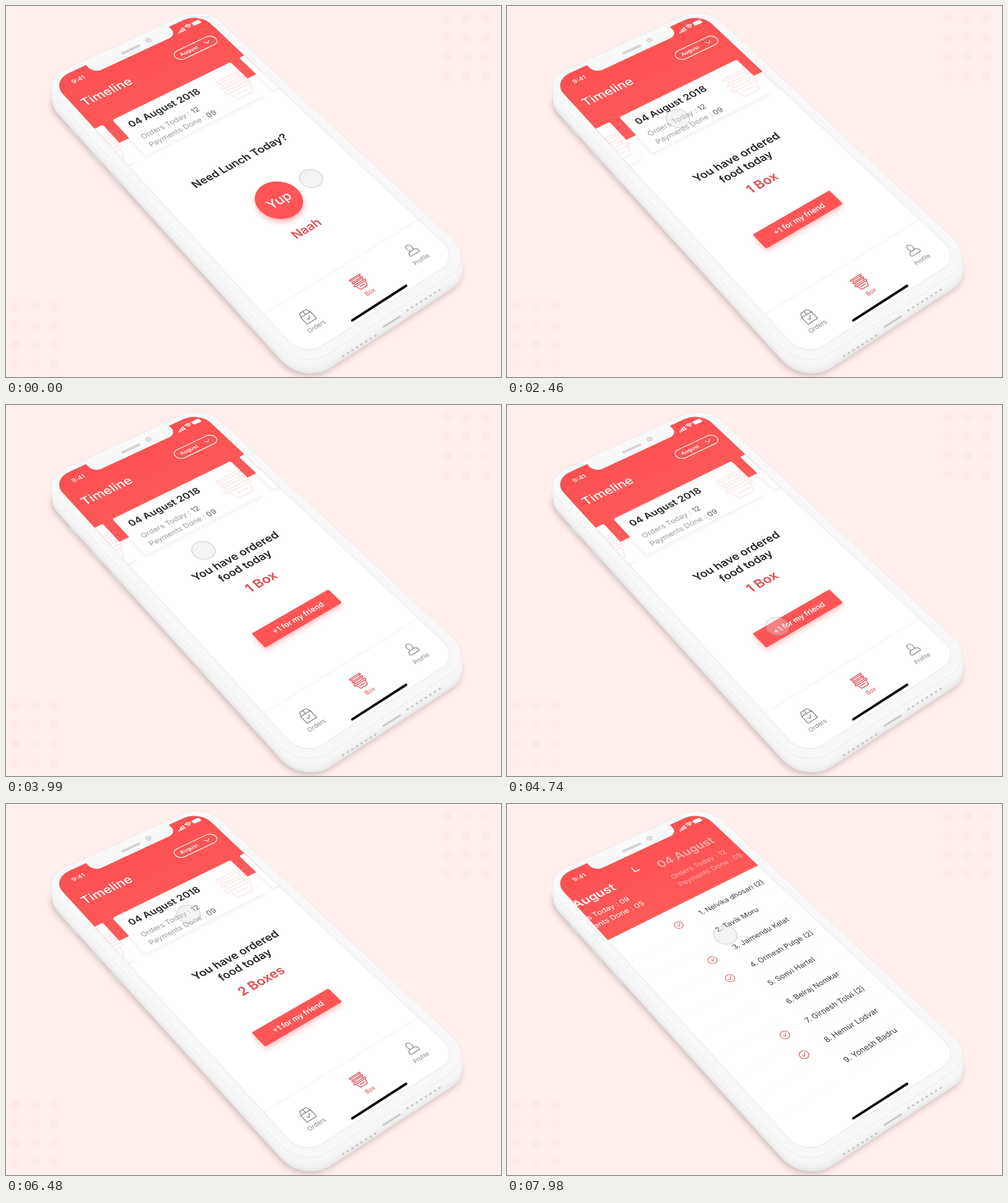
An HTML page with a canvas for the animation above (8 s loop, 800 by 600 pixels).

```html
<!DOCTYPE html>
<html lang="en">
<head>
<meta charset="utf-8">
<title>Lunch box timeline</title>
<style>
html, body { margin: 0; width: 100%; height: 100%; overflow: hidden; background: #feeeec; }
canvas { display: block; width: 800px; height: 600px; }
</style>
</head>
<body>
<canvas id="stage" width="800" height="600"></canvas>
<script>
const ctx = document.getElementById('stage').getContext('2d');
const W = 375, H = 812, TOP = 12, LOOP = 8000;
const RED = '#ff5557', INK = '#28282b', ROSE = '#df4c51';

// Perspective from screen units (375 x 812) to the stage
function project(u, v) {
  const p = u / W, q = v / H, w = 1 + 0.0655 * p - 0.1588 * q;
  return { x: (259.1 * p + 336.6 * q + 68) / w, y: (-109.6 * p + 362.6 * q + 116) / w, w };
}

// Local drawing space lying flat on the screen at (u, v)
function at(u, v, draw) {
  const { x, y, w } = project(u, v);
  ctx.save();
  ctx.transform((259.1 - 0.0655 * x) / w / W, (-109.6 - 0.0655 * y) / w / W,
    (336.6 + 0.1588 * x) / w / H, (362.6 + 0.1588 * y) / w / H, x, y);
  draw();
  ctx.restore();
}

function trace(points) {
  ctx.beginPath();
  for (const [u, v] of points) {
    const p = project(u, v);
    ctx.lineTo(p.x, p.y);
  }
  ctx.closePath();
}

// Rounded rectangle; top and bottom radii may differ
function roundRect(u, v, w, h, rb, rt = rb) {
  const pts = [];
  const corners = [[u + w - rt, v + rt, rt, -90], [u + w - rb, v + h - rb, rb, 0],
    [u + rb, v + h - rb, rb, 90], [u + rt, v + rt, rt, 180]];
  for (const [cx, cy, r, start] of corners) {
    for (let i = 0; i <= 10; i++) {
      const a = (start + i * 9) * Math.PI / 180;
      pts.push([cx + r * Math.cos(a), cy + r * Math.sin(a)]);
    }
  }
  trace(pts);
}

function screenShape() { roundRect(0, TOP, W, H - TOP, 42); }

function fill(color) { ctx.fillStyle = color; ctx.fill(); }

function stroke(color, width) {
  ctx.strokeStyle = color;
  ctx.lineWidth = width;
  ctx.stroke();
}

function shadow(color, blur, x, y) {
  ctx.shadowColor = color;
  ctx.shadowBlur = blur;
  ctx.shadowOffsetX = x;
  ctx.shadowOffsetY = y;
}

function line(points, color, width) {
  ctx.beginPath();
  points.forEach(([x, y]) => ctx.lineTo(x, y));
  stroke(color, width);
}

function flatLine(u1, u2, v, color, width) {
  const a = project(u1, v), b = project(u2, v);
  line([[a.x, a.y], [b.x, b.y]], color, width);
}

// Runs of [string, color] on one baseline, laid flat around their middle
function runs(parts, u, v, size, weight, align = 'left') {
  ctx.font = `${weight} ${size}px Inter, sans-serif`;
  const widths = parts.map(([str]) => ctx.measureText(str).width);
  const total = widths.reduce((a, b) => a + b, 0);
  at(align === 'center' ? u : u + total / 2, v, () => {
    let x = -total / 2;
    parts.forEach(([str, color], i) => {
      ctx.fillStyle = color;
      ctx.fillText(str, x, 0);
      x += widths[i];
    });
  });
}

function text(str, u, v, size, color, weight = 500, align) {
  runs([[str, color]], u, v, size, weight, align);
}

function stat(label, value, u, v, soft, strong) {
  runs([[label + ' : ', soft], [value, strong]], u, v, 17, 400);
}

function faded(alpha, draw) {
  if (alpha <= 0) return;
  ctx.save();
  ctx.globalAlpha *= Math.min(1, alpha);
  draw();
  ctx.restore();
}

function ease(t, from, to) {
  const k = Math.min(1, Math.max(0, (t - from) / (to - from)));
  return k * k * (3 - 2 * k);
}

// Eased value from keys [time, a, b, ...]
function track(keys, t) {
  let i = 0;
  while (i < keys.length - 2 && t >= keys[i + 1][0]) i++;
  const a = keys[i], b = keys[i + 1], k = ease(t, a[0], b[0]);
  return a.slice(1).map((n, j) => n + (b[j + 1] - n) * k);
}

const POINTER = [[0, 493, 279], [450, 441, 314], [1380, 436, 317], [2300, 267, 186],
  [2460, 276, 182], [2950, 302, 169], [3360, 284, 177], [3650, 270, 184], [4600, 437, 358],
  [5300, 437, 358], [6300, 295, 178], [6900, 295, 178], [7450, 255, 260], [7980, 353, 212]];
const DRAG = [[2250, 0], [2460, 14], [2950, 60], [3360, 42], [3750, 0]];
const DAYS = [['03', '09', '05'], ['04', '12', '09'], ['05', '10', '07']];
const PEOPLE = ['Nelvika dhosari (2)', 'Tavik Moru', 'Jaimendu Kelat', 'Ormesh Pulge (2)',
  'Sonvi Hartel', 'Belraj Nomkar', 'Girnesh Tolvi (2)', 'Hemur Lodvar', 'Yonesh Badru'];
const PAID = [0, 2, 3, 6, 7];

function backdrop() {
  ctx.fillStyle = '#feeeec';
  ctx.fillRect(0, 0, 800, 600);
  for (const [x0, y0] of [[16, 486], [713, 20]]) {
    for (let i = 0; i < 12; i++) {
      ctx.beginPath();
      ctx.arc(x0 + i % 3 * 31, y0 + Math.floor(i / 3) * 31, 7.5, 0, 7);
      fill('rgba(250, 200, 198, .11)');
    }
  }
}

function rim() { roundRect(-19, -1, 416, 832, 60); }

function body() {
  const depth = 23;
  for (let i = depth; i >= 0; i--) {
    ctx.save();
    ctx.translate(i * 0.1, i);
    rim();
    if (i === depth) shadow('rgba(120, 95, 95, .32)', 10, -2, 4);
    const g = i === 0 ? 248 : 246 - Math.round(14 * Math.pow(i / depth, 3));
    fill(`rgb(${g}, ${g}, ${g})`);
    ctx.restore();
  }
  rim();
  stroke('rgba(190, 190, 190, .25)', 1);
  ctx.lineCap = 'round';
  line([[104, 199], [113, 209]], '#dcdcdc', 3);
  line([[139, 238], [152, 253]], '#dcdcdc', 3);
  line([[170, 273], [185, 290]], '#dcdcdc', 3);
  line([[610, 519], [637, 502]], '#c8c8c8', 3);
  for (let i = 0; i < 8; i++) {
    for (const [x, y] of [[545, 566], [649, 492]]) {
      ctx.beginPath();
      ctx.ellipse(x + i * 7.4, y - i * 4.7, 2.2, 1.6, -0.6, 0, 7);
      fill('#c4c4c4');
    }
  }
}

function boxIcon(u, v, size, color) {
  at(u, v, () => {
    const s = size / 24;
    ctx.scale(s, s);
    ctx.beginPath();
    ctx.rect(-12, 0, 24, 3);
    ctx.moveTo(-10, 3); ctx.lineTo(-7, 12); ctx.lineTo(7, 12); ctx.lineTo(10, 3);
    ctx.moveTo(-5, 7); ctx.lineTo(5, 7);
    for (const y of [-6, -12]) {
      ctx.rect(-11, y, 22, 2.5);
      ctx.moveTo(-9, y + 2.5); ctx.lineTo(-8, y + 6);
      ctx.lineTo(8, y + 6); ctx.lineTo(9, y + 2.5);
    }
    stroke(color, 1.4);
  });
}

function navBar() {
  trace([[0, 705], [W, 705], [W, H], [0, H]]);
  fill('#fff');
  flatLine(0, W, 703, '#f9f8f8', 3);
  const gray = '#858585';
  at(60, 750, () => {
    ctx.beginPath();
    ctx.rect(-11, -4, 22, 17);
    ctx.moveTo(-11, -4); ctx.lineTo(-7, -12); ctx.lineTo(7, -12); ctx.lineTo(11, -4);
    ctx.moveTo(0, -12); ctx.lineTo(0, -4);
    ctx.moveTo(-4, 4); ctx.lineTo(-1, 7); ctx.lineTo(4, 1);
    stroke(gray, 1.6);
  });
  boxIcon(185, 748, 27, ROSE);
  at(314, 748, () => {
    ctx.beginPath();
    ctx.ellipse(0, -5, 6, 7.5, 0, 0, 7);
    ctx.moveTo(-4, 1);
    ctx.bezierCurveTo(-14, 4, -12, 11, -10, 11);
    ctx.lineTo(10, 11);
    ctx.bezierCurveTo(12, 11, 14, 4, 4, 1);
    stroke(gray, 1.6);
  });
  text('Orders', 60, 780, 12, gray, 400, 'center');
  text('Box', 187, 779, 12, ROSE, 400, 'center');
  text('Profile', 314, 779, 12, gray, 400, 'center');
}

function header(bottom) {
  const g = ctx.createLinearGradient(190, 40, 265, 200);
  g.addColorStop(0, '#fb4e50');
  g.addColorStop(1, '#ff5c5c');
  trace([[-5, -5], [W + 5, -5], [W + 5, bottom], [-5, bottom]]);
  fill(g);
}

function titleBar() {
  text('Timeline', 76, 109, 29, '#fff', 500, 'center');
  roundRect(251, 81, 105, 28, 14);
  stroke('#fff', 1.3);
  text('August', 286, 99.5, 13, '#fff', 600, 'center');
  at(334, 95, () => line([[-6, -3], [0, 3], [6, -3]], '#fff', 1.7));
}

function cards(drag) {
  DAYS.forEach(([day, orders, paid], i) => {
    const u = (i - 1) * 319 + drag;
    ctx.save();
    shadow('rgba(90, 60, 60, .08)', 5, 0, 3);
    roundRect(u + 42, 170, 296, 114, 4);
    fill('#fff');
    ctx.restore();
    boxIcon(u + 305, 233, 64, 'rgba(240, 80, 80, .1)');
    text(day + ' August 2018', u + 60, 208, 22.5, INK, 600);
    stat('Orders Today', orders, u + 62, 246, '#9b9b9b', '#5a5a5a');
    stat('Payments Done', paid, u + 63, 272, '#9b9b9b', '#5a5a5a');
  });
}

function question(grow) {
  text('Need Lunch Today?', 185, 405, 24, INK, 600, 'center');
  at(186, 517, () => {
    ctx.beginPath();
    ctx.arc(0, 0, 46 * grow, 0, 7);
    shadow('rgba(255, 70, 75, .4)', 9, 1, 5);
    fill(RED);
  });
  text('Yup', 186, 527, 28 * grow, '#fff', 500, 'center');
  text('Naah', 185, 608, 25.5, '#dd5358', 600, 'center');
}

function ordered(t) {
  text('You have ordered', 184, 393, 24.5, INK, 600, 'center');
  text('food today', 184, 423, 24, INK, 600, 'center');
  const more = ease(t, 5050, 5300);
  faded(1 - more, () => text('1 Box', 185, 474, 28, ROSE, 600, 'center'));
  faded(more, () => text('2 Boxes', 185, 474, 28, ROSE, 600, 'center'));
  ctx.save();
  shadow('rgba(255, 80, 85, .3)', 8, 1, 5);
  roundRect(92, 552, 188, 40, 3);
  fill(RED);
  ctx.restore();
  text('+1 for my friend', 187, 578, 16, '#fff', 600, 'center');
}

function dayHeading(day, orders, paid, u, alpha) {
  faded(alpha, () => {
    text(day + ' August', u, 108, 28, '#fff', 600);
    stat('Orders Today', orders, u + 2, 148, '#fff', '#fff');
    stat('Payments Done', paid, u + 2, 174, '#fff', '#fff');
  });
}

function dayList(shift) {
  for (const page of [-1, 0]) {
    const u = shift + page * W;
    PEOPLE.forEach((name, i) => {
      const v = 261 + i * 55.4;
      flatLine(u + 20, u + W - 20, v + 23, 'rgba(0, 0, 0, .03)', 1);
      text(`${i + 1}. ${name}`, u + 30, v, 16.5, '#3a3a3c', 400);
      if (!PAID.includes(i)) return;
      at(u + 353, v - 3, () => {
        ctx.beginPath();
        ctx.arc(0, 0, 9, 0, 7);
        ctx.moveTo(-4, 0); ctx.lineTo(-1, 3); ctx.lineTo(4, -3);
        stroke('#d9555a', 1.4);
      });
    });
  }
}

function statusBar() {
  text('9:41', 48, 43, 15, '#fff', 500, 'center');
  for (let i = 0; i < 4; i++) {
    roundRect(300 + i * 5, 37 - i * 2.6, 3.2, 4 + i * 2.6, 0.8);
    fill('#fff');
  }
  at(330, 39, () => {
    for (const r of [3, 7, 11]) {
      ctx.beginPath();
      ctx.arc(0, 0, r, -2.3, -0.84);
      stroke('#fff', 2.2);
    }
  });
  roundRect(341, 28, 20, 11, 2.5);
  fill('#fff');
}

function notch() {
  roundRect(84, 4, 210, 37, 20, 1);
  fill('#f8f8f8');
  roundRect(163, 21, 48, 7, 3.5);
  fill('#d4d4d4');
  at(234, 22, () => {
    ctx.beginPath();
    ctx.arc(0, 0, 6, 0, 7);
    fill('#e2e2e2');
    stroke('#c6c6c6', 1.2);
  });
}

function pointer(t) {
  const [x, y] = track(POINTER, t);
  ctx.save();
  ctx.transform(0.66, -0.37, 0.53, 0.54, x, y);
  ctx.beginPath();
  ctx.arc(0, 0, 22.5, 0, 7);
  fill('rgba(222, 218, 218, .32)');
  stroke('rgba(150, 140, 140, .4)', 1.4);
  ctx.restore();
}

function render(t) {
  const open = ease(t, 6800, 7300), swipe = ease(t, 7480, 7980);
  ctx.setTransform(1, 0, 0, 1, 0, 0);
  ctx.lineJoin = 'round';
  backdrop();
  body();

  ctx.save();
  screenShape();
  fill('#fff');
  ctx.clip();
  header(228 - 15 * open);
  faded(1 - open * 2, () => {
    titleBar();
    cards(track(DRAG, t)[0]);
    faded(1 - ease(t, 520, 760), () => question(1 - 0.25 * ease(t, 520, 760)));
    faded(ease(t, 720, 1000), () => ordered(t));
    navBar();
  });
  faded(open * 2 - 1, () => {
    dayHeading('03', '09', '05', -154 + 105 * swipe, 0.5 + 0.5 * swipe);
    dayHeading('04', '12', '09', 96 + 105 * swipe, 1 - 0.45 * swipe);
    at(157, 81, () => line([[-5, -6], [-5, 6], [6, 6]], '#fff', 2.6));
    dayList(160 * swipe);
  });
  statusBar();
  ctx.restore();

  screenShape();
  stroke('rgba(170, 165, 165, .35)', 0.8);
  notch();
  flatLine(120, 250, 802.5, '#050505', 4);
  pointer(t);
}

function tick(now) {
  render(now % LOOP);
  requestAnimationFrame(tick);
}
requestAnimationFrame(tick);
</script>
</body>
</html>
```
